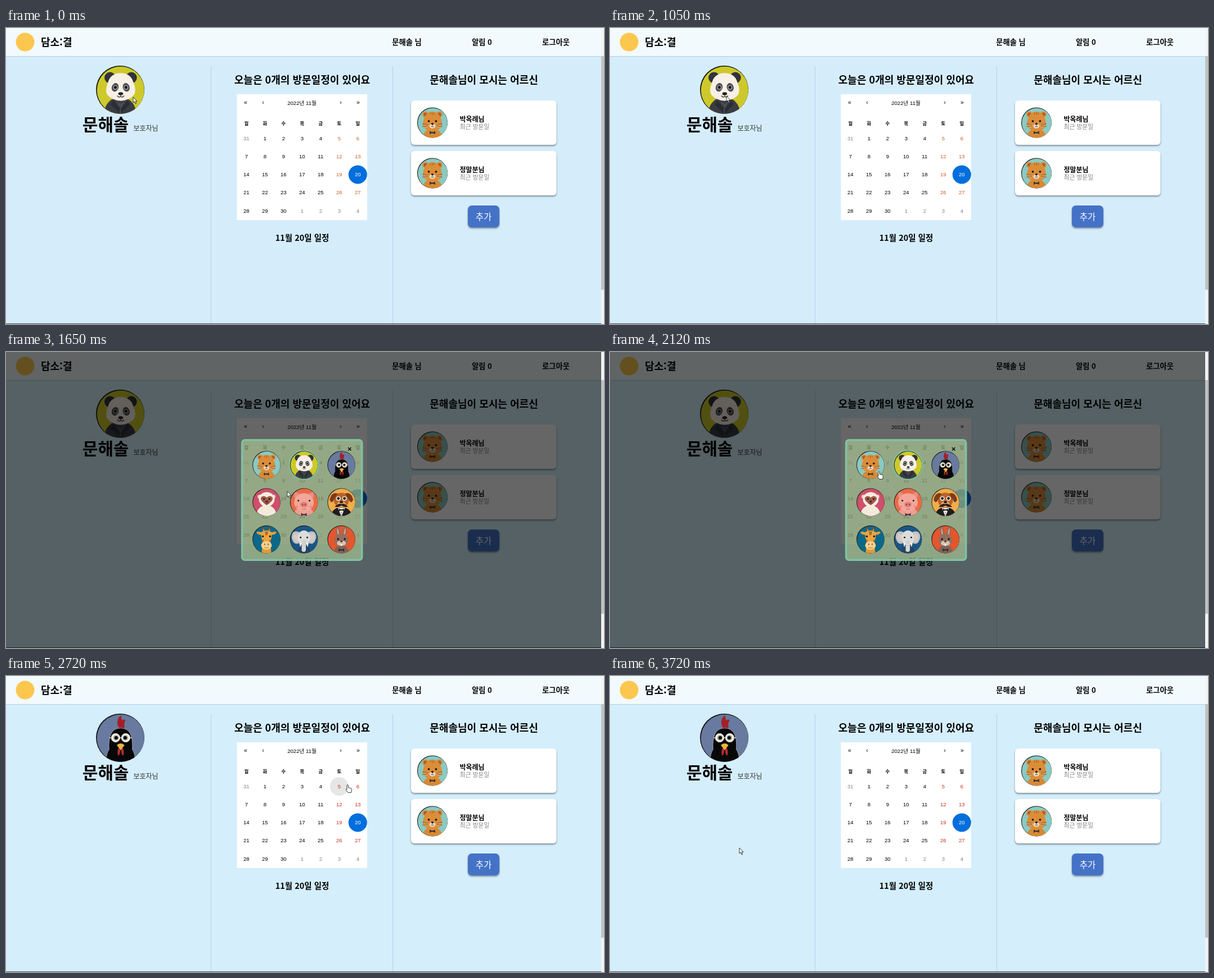
An HTML page for the animation above (4.12 s loop, 1063 px wide and 527 px high).

```html
<!DOCTYPE html>
<html lang="ko">
<head>
<meta charset="utf-8">
<title>방문일정</title>
<style>
html, body { margin: 0; width: 100%; height: 100%; overflow: hidden; background: #d5eefb; }
svg { display: block; width: 100%; height: 100%; }
text { font-family: "Noto Sans CJK KR", "Noto Sans CJK", sans-serif; }
.cal text { font-family: "Liberation Sans", "Noto Sans CJK KR", "Noto Sans CJK", sans-serif; }
.card { filter: drop-shadow(0 2px 1.5px rgba(0, 0, 0, .4)); }
</style>
</head>
<body>
<svg id="stage" viewBox="0 0 1063 527" preserveAspectRatio="none"></svg>
<script>
const rect = (x, y, w, h, fill, more = '') =>
  `<rect x="${x}" y="${y}" width="${w}" height="${h}" fill="${fill}" ${more}/>`;
const oval = (x, y, rx, ry, fill, more = '') =>
  `<ellipse cx="${x}" cy="${y}" rx="${rx}" ry="${ry}" fill="${fill}" ${more}/>`;
const dot = (x, y, r, fill, more) => oval(x, y, r, r, fill, more);
const shape = (d, fill, more = '') => `<path d="${d}" fill="${fill}" ${more}/>`;
const line = (d, color, w = 1.5) => shape(d, 'none', `stroke="${color}" stroke-width="${w}"`);
const pair = draw => draw(-1) + draw(1);
const label = (x, y, size, str, more = '') =>
  `<text x="${x}" y="${y}" font-size="${size}" ${more}>${str}</text>`;
const bold = 'font-weight="700"';
const mid = 'text-anchor="middle"';

// Animal portraits, drawn in a disc of radius 50
const bow = (y, w, fill = '#2d313c') =>
  shape(`M0 ${y}L${-w} ${y - w * .6}V${y + w * .6}ZL${w} ${y - w * .6}V${y + w * .6}Z`, fill) + dot(0, y, w * .28, fill);
const torso = (w, top, fill) =>
  shape(`M${-w} 54Q${-w + 2} ${top + 4} 0 ${top}Q${w - 2} ${top + 4} ${w} 54Z`, fill);
const eyes = (x, y, r) => pair(s => dot(s * x, y, r, '#17171a'));

const animals = {
  tiger: ['#8acac2', () =>
    torso(33, 18, '#d88933') +
    pair(s => dot(s * 23, -27, 10, '#d88933') + dot(s * 23, -27, 5.5, '#a85b2b')) +
    shape('M0-36Q20-36 26-18Q34 2 30 12Q20 27 0 28Q-20 27-30 12Q-34 2-26-18Q-20-36 0-36Z', '#dc8d38') +
    pair(s => oval(s * 20, 10, 9, 6, '#e6a45c')) +
    oval(0, 11, 10, 8, '#f3dcc0') + eyes(12, -5, 3.4) +
    oval(0, 4, 4.5, 3, '#2a2020') + line('M0 6V11M-5 12Q0 16 5 12', '#333') +
    pair(s => line(`M${s * 14} 7L${s * 33} 4M${s * 14} 11L${s * 33} 13`, '#3b2a22', 1.2)) +
    line('M0-34V-25M-6-33V-27M6-33V-27', '#a85b2b', 2) + bow(33, 9)],
  panda: ['#cdc92b', () =>
    pair(s => dot(1 + s * 22, -25, 11.5, '#30333c')) +
    torso(34, 14, '#393c43') +
    shape('M1-35Q22-34 27-16Q34 0 29 10Q20 22 1 23Q-18 22-27 10Q-32 0-25-16Q-20-34 1-35Z', '#f8efe5') +
    pair(s => oval(1 + s * 11.5, -5, 7, 9, '#4c4d54', `transform="rotate(${s * -18} ${1 + s * 11.5} -5)"`) +
      dot(1 + s * 11, -5, 4.4, '#e9e7e1') + dot(1 + s * 11, -5, 3.3, '#16181c')) +
    oval(1, 8, 5, 3, '#202227') + line('M1 10V14M-6 12Q-3 17 1 14Q5 17 8 12', '#2c2d31') +
    shape('M-14 22L-20 30L0 50L20 30L15 22L1 40Z', '#2b2d33') +
    shape('M-8 23L1 29L10 23L1 39Z', '#4a4c54') + line('M0 40V50', '#666')],
  rooster: ['#687a9f', () =>
    shape('M-1-18Q-8-28-5-38Q-2-46 3-46Q1-39 5-36Q9-40 11-36Q7-29 9-24L7-16Z', '#a31f27') +
    shape('M-30 54Q-29 32-23 24Q-26-20 1-20Q28-20 25 24Q31 32 32 54Z', '#080809', 'stroke="#b8bfce" stroke-width=".8"') +
    pair(s => dot(1 + s * 10.5, 0, 9, '#f3f1eb', 'stroke="#d5c9b6" stroke-width="1"') + dot(1 + s * 9.8, 0, 5.6, '#a9a7a0') +
      dot(1 + s * 9.3, 0, 3.6, '#080809')) +
    line('M-19 0H-22M21 0H24M-2 0H4', '#eee6d6') +
    pair(s => shape(`M${1 + s * 2} 19Q${1 + s * 8} 23 ${1 + s * 6} 36Q${1 + s * 2} 39 ${1 + s} 26Z`, '#b52c30')) +
    shape('M-7 15Q1 8 9 15L1 26Z', '#e7b63e')],
  sloth: ['#cf4f6c', () =>
    pair(s => dot(s * 25, -20, 7, '#e8d8c4')) + torso(37, 10, '#f3eadb') +
    oval(1, -10, 28, 26, '#f5ecdf') +
    shape('M1-16Q-5-24-15-21Q-25-16-17-4Q-8 6 1 11Q10 6 19-4Q27-16 17-21Q7-24 1-16Z', '#a05b49') +
    pair(s => dot(1 + s * 10, -11, 3, '#17171a')) + oval(1, -2, 5, 3.5, '#4b2925') + line('M-5 4Q1 8 7 4', '#4b2925')],
  pig: ['#e96b47', () =>
    pair(s => shape(`M${s * 12}-28L${s * 33}-38Q${s * 39}-20 ${s * 29}-10Z`, '#e68f85')) +
    torso(38, 16, '#ef9d92') + oval(0, 1, 35, 33, '#f3a69a') +
    eyes(20, -5, 3) + oval(0, 9, 13, 10, '#df8078') +
    pair(s => oval(s * 5, 9, 2.5, 4, '#9b4b4b') + dot(s * 25, 16, 4.5, '#ed8d83')) +
    line('M-7 24Q0 28 7 24', '#9b4b4b') + bow(45, 10)],
  dog: ['#efad4c', () =>
    torso(38, 17, '#1d1c20') + shape('M-13 20L0 52L13 20Z', '#f5f1e8') +
    oval(0, -7, 27, 27, '#b86429') +
    pair(s => shape(`M${s * 13}-31Q${s * 36}-38 ${s * 42}-8Q${s * 35} 8 ${s * 27}-8Z`, '#7e3a1c') +
      dot(s * 11, -13, 8, '#f9f4ea') + dot(s * 11, -13, 5, '#17171a')) +
    oval(0, 7, 15, 11, '#e3aa67') + oval(0, 0, 6, 4, '#201b1d') +
    shape('M0 7Q-10 2-24 17Q-10 19 0 12Q10 19 24 17Q10 2 0 7Z', '#281d1c') +
    bow(28, 9, '#18181c') + dot(0, 37, 1.5, '#222') + dot(0, 44, 1.5, '#222')],
  giraffe: ['#0c6889', () =>
    shape('M-18 54L-13 8H13L18 54Z', '#e39a35') +
    pair(s => line(`M${s * 8}-25L${s * 12}-40`, '#d78b31', 4) + dot(s * 12.5, -41, 4, '#80451f') +
      oval(s * 25, -22, 11, 5, '#e49d3d', `transform="rotate(${s * -18} ${s * 25} -22)"`)) +
    shape('M-19-26Q0-38 19-26Q20-7 14 7L17 24Q0 39-17 24L-14 7Q-20-7-19-26Z', '#eca540') +
    oval(0, 22, 19, 15, '#f3d18c') + eyes(13, -11, 3.5) +
    shape('M-6-28L6-28L3-15H-3ZM-17 3L-10 1L-11 10ZM17 3L10 1L11 10Z', '#b96528') +
    pair(s => oval(s * 6, 18, 2, 3, '#8a5730')) + line('M-8 29Q0 33 8 29', '#8a5730')],
  elephant: ['#1b5585', () =>
    pair(s => shape(`M${s * 13}-25Q${s * 44}-38 ${s * 44}-6Q${s * 37} 25 ${s * 15} 12Z`, '#bfc3c6') +
      shape(`M${s * 18}-18Q${s * 38}-25 ${s * 38}-5Q${s * 30} 14 ${s * 17} 6Z`, '#d8cbc6')) +
    torso(25, 18, '#254364') + oval(0, -6, 22, 26, '#dcddda') +
    pair(s => shape(`M${s * 8} 14L${s * 17} 12L${s * 13} 28Z`, '#fffaf0')) +
    shape('M-9-1H9L7 27Q9 45 0 45Q-10 45-8 33Z', '#d7d9d6') + eyes(12, -7, 3) +
    line('M-6 8H6M-6 15H6M-5 22H5', '#a9afb1', 1.3)],
  rabbit: ['#e3562e', () =>
    pair(s => oval(s * 12, -27, 7, 20, '#8a6959', `transform="rotate(${s * 9} ${s * 12} -27)"`) +
      oval(s * 12, -26, 3.2, 14, '#d39a87', `transform="rotate(${s * 9} ${s * 12} -26)"`)) +
    torso(29, 20, '#826253') + oval(0, 3, 24, 24, '#916e5d') +
    pair(s => oval(s * 7, 14, 9, 8, '#d8c4b4')) + eyes(12, -1, 3.6) +
    oval(0, 8, 4, 3, '#52342e') + rect(-3, 17, 6, 6, '#fffaf0') + bow(38, 10)]
};
const names = Object.keys(animals);
const defs = '<clipPath id="disc"><circle cx=".9" cy=".7" r="49"/></clipPath>' + names.map(n =>
  `<g id="${n}">${dot(0, 0, 50, '#111')}<g clip-path="url(#disc)">${dot(0, 0, 50, animals[n][0])}${animals[n][1]()}</g></g>`).join('');
const portrait = (n, x, y, r, id = '') =>
  `<use ${id} href="#${n}" transform="translate(${x} ${y}) scale(${r / 50})"/>`;

const USER = '문해솔';
const header = () => rect(0, 0, 1058, 50, '#f2fafe') + rect(0, 50, 1058, 1, '#b1cee0') +
  dot(34, 25, 16.5, '#fcc74f') + label(62, 32, 18, '담소:결', bold) +
  label(712.5, 30, 13.3, USER + ' 님', bold + mid) + label(846, 30, 13.1, '알림 0', bold + mid) +
  label(977.5, 30, 13.3, '로그아웃', bold + mid);

const card = (y, name) => rect(720, y, 258.5, 79, '#fff', 'rx="6" class="card"') +
  portrait('tiger', 758, y + 39.5, 27) + label(806.5, y + 37.6, 12, name, bold) +
  label(806.5, y + 51, 10.8, '최근 방문일', 'fill="#858585"');

const colX = i => 427.3 + 33 * i, rowY = j => 196.7 + 32.1 * j;
function calendar() {
  let s = rect(410.5, 118, 231.5, 224, '#fff') + dot(0, 0, 16.5, '#e6e6e6', 'id="hover"') +
    dot(colX(6), rowY(2), 16.5, '#006edc') + label(526, 137, 9.6, '2022년 11월', mid);
  [['«', 426], ['‹', 457], ['›', 595], ['»', 626]].forEach(([c, x]) => s += label(x, 136, 10.5, c, mid));
  [...'월화수목금토일'].forEach((c, i) => s += label(colX(i), 172.7, 8.3, c, bold + mid));
  for (let k = 0; k < 35; k++) {
    const i = k % 7, j = Math.floor(k / 7), out = k < 1 || k > 30;
    const day = k < 1 ? 31 : k > 30 ? k - 30 : k;
    const look = out ? 'fill="#808080"' : k === 20 ? 'fill="#fff"' : i > 4 ? 'class="rest"' : '';
    s += label(colX(i), rowY(j) + 3.4, 9.6, day, mid + ' ' + look);
  }
  return `<g class="cal">${s}</g>`;
}

const page = () => rect(0, 0, 1063, 527, '#d5eefb', 'id="back"') + header() +
  rect(364, 68, 1, 459, '#b5d1e9') + rect(687, 68, 1, 459, '#b5d1e9') +
  portrait('panda', 203, 110, 43, 'id="me"') +
  label(136, 183.3, 29.8, USER, bold) + label(226.5, 183, 12, '보호자님', 'fill="#333"') +
  label(526.5, 99.3, 18.05, '오늘은 0개의 방문일정이 있어요', bold + mid) + calendar() +
  label(526.5, 379, 14.5, '11월 20일 일정', bold + mid) +
  label(849.5, 99.3, 18.05, USER + '님이 모시는 어르신', bold + mid) +
  card(129, '박옥례님') + card(219, '정말분님') +
  rect(821, 316, 56, 39, '#4472c7', 'rx="7" class="card"') +
  label(849, 341.5, 15.5, '추가', 'fill="#fff" ' + mid) +
  rect(0, 526, 1058, 1, '#3a474f');

const seats = names.map((n, k) => [n, 463 + 66.6 * (k % 3), 201 + 66.3 * Math.floor(k / 3)]);
const modal = () => rect(0, 0, 1058, 527, '#000', 'opacity=".6"') +
  rect(420, 157, 212.5, 213, '#b3d49c', 'rx="4" fill-opacity=".6"') +
  rect(419.7, 156.7, 213, 213.5, 'none', 'rx="5" stroke="#7fc2a2" stroke-width="3.6"') +
  dot(seats[1][1], 201, 27, '#7fc2a2') +
  seats.map(([n, x, y]) => portrait(n, x, y, 24.8)).join('') +
  `<g id="close">${line('M608 170L613.5 175.5M613.5 170L608 175.5', '#111', 1.7)}</g>`;

const scrollbar = rect(1058, 0, 5, 527, '#f3f3f3') + rect(1058, 50, 5, 416, '#c2c2c2');
const ink = 'stroke="#222" stroke-width=".9" stroke-linejoin="round"';
const pointer = '<g id="pointer">' +
  shape('M0 0V10L2.3 7.9L4 12L5.7 11.3L4 7.4H7Z', '#fff', 'id="arrow" ' + ink) +
  shape('M-1 1.5Q.2-.6 1.4 1.5V5.6L6 6.7Q8 7.3 7.5 9.8L6.5 14.5H1L-2.8 9.6Q-3 7.7-1 8.8Z', '#fff', 'id="hand" ' + ink) +
  dot(.5, .5, 8.5, '#d2cb3c', 'id="ring" opacity=".72"') + '</g>';

document.getElementById('stage').innerHTML =
  `<defs>${defs}</defs>${page()}<g id="modal">${modal()}</g>${scrollbar}${pointer}`;

const el = id => document.getElementById(id);
const parts = Object.fromEntries(
  ['back', 'me', 'hover', 'modal', 'close', 'pointer', 'arrow', 'hand', 'ring'].map(id => [id, el(id)]));
const show = (node, on) => node.setAttribute('visibility', on ? 'inherit' : 'hidden');
const rest = document.querySelectorAll('.rest');

// Pointer path: step, x, y
const LOOP = 4120, STEP = 1000 / 15, OPEN = 17, SHUT = 41;
const path = [[0, 226, 123], [1, 226, 123], [4, 265, 168], [5, 277, 183], [7, 250, 158], [10, 207, 121],
  [16, 207, 121], [17, 214, 137], [21, 500, 238], [22, 530, 247], [25, 500, 248], [27, 439, 235],
  [29, 476, 226], [30, 475, 220], [32, 478, 212], [37, 607, 193], [41, 607, 193], [48, 333, 254], [56, 230, 306]];

function place(n) {
  const k = path.findIndex(p => p[0] >= n);
  if (k < 0) return path[path.length - 1].slice(1);
  if (k === 0) return path[0].slice(1);
  const [n0, x0, y0] = path[k - 1], [n1, x1, y1] = path[k];
  let u = (n - n0) / (n1 - n0);
  if (n1 === 56) u = u * (2 - u);
  return [x0 + (x1 - x0) * u, y0 + (y1 - y0) * u];
}

function draw(ms) {
  const n = Math.floor((ms % LOOP + 20.5) / STEP);
  const [x, y] = place(n);
  const open = n >= OPEN && n < SHUT, done = n >= SHUT;
  const col = Math.floor((x - 410.8) / 33), row = Math.floor((y - 180.6) / 32.1);
  const onDay = done && col >= 0 && col < 7 && row >= 0 && row < 5;
  const onSeat = open && seats.some(([, sx, sy]) => Math.hypot(x - sx, y - sy) < 25);
  const inside = x > 418 && x < 634 && y > 155 && y < 372;

  show(parts.modal, open);
  show(parts.close, open && inside);
  show(parts.hover, onDay);
  if (onDay) {
    parts.hover.setAttribute('cx', colX(col));
    parts.hover.setAttribute('cy', rowY(row));
  }
  parts.me.setAttribute('href', done ? '#rooster' : '#panda');
  parts.back.setAttribute('fill', open ? '#d6f4fa' : done ? '#d4eefb' : '#d5edfb');
  rest.forEach(t => t.setAttribute('fill', done ? '#c9301f' : '#c8602a'));
  parts.pointer.setAttribute('transform', `translate(${x} ${y})`);
  show(parts.hand, onDay || onSeat);
  show(parts.arrow, !onDay && !onSeat);
  show(parts.ring, n === 14 || n === 15 || n === 39 || n === 40);
}

const start = performance.now();
function tick() {
  draw(performance.now() - start);
  requestAnimationFrame(tick);
}
tick();
</script>
</body>
</html>
```
